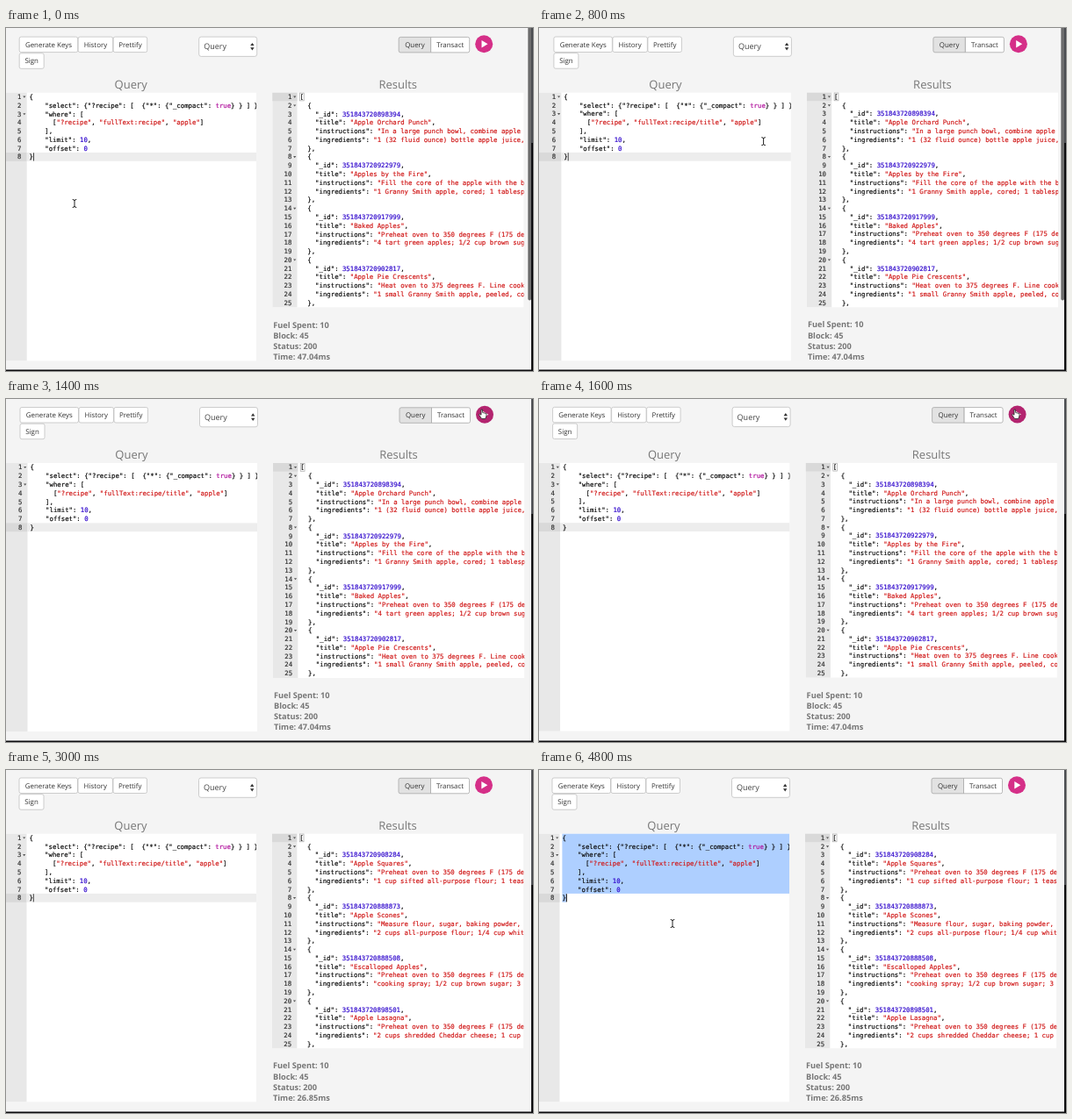
An HTML page with a canvas that plays this animation: 600x391 px, repeating every 5000 ms.

```html
<!DOCTYPE html>
<html lang="en">
<head>
<meta charset="utf-8">
<title>Query console</title>
<style>
html, body { margin: 0; width: 100%; height: 100%; overflow: hidden; background: #f4f4f4; }
canvas { display: block; width: 600px; height: 391px; }
</style>
</head>
<body>
<canvas id="stage" width="600" height="391"></canvas>
<script>
const ctx = document.getElementById('stage').getContext('2d');
const LOOP = 5000, STEP = 100, TOP = 72.4, ROW = 9.785;
const CODE_SCALE = 0.611, COL = 12 * 0.602 * CODE_SCALE;
const SANS = '"Open Sans", sans-serif', MONO = '"DejaVu Sans Mono", monospace';
const BLACK = '#0c0c0c', RED = '#d01818', BLUE = '#3008cc', PURPLE = '#b0109c';

const queryLines = path => [
  '{',
  '    "select": {"?recipe": [  {"*": {"_compact": true} } ] },',
  '    "where": [',
  `      ["?recipe", "${path}", "apple"]`,
  '    ],',
  '    "limit": 10,',
  '    "offset": 0',
  '}'
];

const resultLines = recipes => ['['].concat(...recipes.map(([id, title, steps, items]) => [
  '  {',
  `    "_id": ${id},`,
  `    "title": "${title}",`,
  `    "instructions": "${steps}",`,
  `    "ingredients": "${items}",`,
  '  },'
]));

const PREHEAT = 'Preheat oven to 350 degrees F (175 degrees C)';
const before = {
  lines: resultLines([
    ['351843720898394', 'Apple Orchard Punch', 'In a large punch bowl, combine apple juice', '1 (32 fluid ounce) bottle apple juice, chilled'],
    ['351843720922979', 'Apples by the Fire', 'Fill the core of the apple with the butter', '1 Granny Smith apple, cored; 1 tablespoon'],
    ['351843720917999', 'Baked Apples', PREHEAT, '4 tart green apples; 1/2 cup brown sugar'],
    ['351843720902817', 'Apple Pie Crescents', 'Heat oven to 375 degrees F. Line cookie', '1 small Granny Smith apple, peeled, cored']
  ]),
  time: '47.04ms'
};
const after = {
  lines: resultLines([
    ['351843720908284', 'Apple Squares', PREHEAT, '1 cup sifted all-purpose flour; 1 teaspoon'],
    ['351843720888873', 'Apple Scones', 'Measure flour, sugar, baking powder, salt', '2 cups all-purpose flour; 1/4 cup white sugar'],
    ['351843720888508', 'Escalloped Apples', PREHEAT, 'cooking spray; 1/2 cup brown sugar; 3 tart'],
    ['351843720898501', 'Apple Lasagna', PREHEAT, '2 cups shredded Cheddar cheese; 1 cup ricotta']
  ]),
  time: '26.85ms'
};

// Keyframes: time, x, y
const drift = [[0, 0.2, 1.1], [400, 1.9, 1], [1200, 1.9, 1], [1400, 1, 0.5], [1900, 0, 0]];
const pointer = [[0, 78, 200], [300, 74, 200], [600, 74, 200], [1100, 528, 23], [1400, 543, 17],
  [1600, 543, 17], [1800, 612, 6], [3800, 612, 190], [4400, 163, 177], [4600, 152, 175]];

function along(keys, t) {
  const next = keys.findIndex(k => k[0] > t);
  if (next < 0) return keys[keys.length - 1].slice(1);
  const a = keys[next - 1], b = keys[next], p = (t - a[0]) / (b[0] - a[0]);
  return [a[1] + (b[1] - a[1]) * p, a[2] + (b[2] - a[2]) * p];
}

function rect(x, y, w, h, color) {
  ctx.fillStyle = color;
  ctx.fillRect(x, y, w, h);
}

function text(str, x, y, font, color, align = 'left') {
  ctx.font = font;
  ctx.fillStyle = color;
  ctx.textAlign = align;
  ctx.fillText(str, x, y);
}

function shape(points, color, outline) {
  ctx.beginPath();
  points.forEach(([x, y]) => ctx.lineTo(x, y));
  ctx.closePath();
  ctx.fillStyle = color;
  ctx.fill();
  if (outline) {
    ctx.strokeStyle = outline;
    ctx.lineWidth = 0.8;
    ctx.stroke();
  }
}

function box(x, y, w, h, fill, radius = 2, border = '#c0c0c0') {
  ctx.beginPath();
  ctx.roundRect(x, y, w, h, radius);
  ctx.fillStyle = fill;
  ctx.fill();
  ctx.strokeStyle = border;
  ctx.lineWidth = 0.8;
  ctx.stroke();
}

function button(label, x, y, w, fill = '#fff', radius = 2, border) {
  box(x, y, w, 17.5, fill, radius, border);
  text(label, x + w / 2, y + 11.6, `7.9px ${SANS}`, '#333', 'center');
}

function codeText(str, x, y, color, align) {
  ctx.save();
  ctx.translate(x, y);
  ctx.scale(CODE_SCALE, CODE_SCALE);
  text(str, 0, 0, `12px ${MONO}`, color, align);
  // A hairline stroke gives the slightly heavier screen rendering
  ctx.strokeStyle = color;
  ctx.lineWidth = 0.3;
  ctx.strokeText(str, 0, 0);
  ctx.restore();
}

function codeLine(line, x, y) {
  for (const m of line.matchAll(/"[^"]*"(:?)|\d+|true|[^\s"\dt]+/g)) {
    const s = m[0];
    let color = BLACK;
    if (s[0] === '"' && !m[1]) color = RED;
    else if (/^\d/.test(s)) color = BLUE;
    else if (s === 'true') color = PURPLE;
    codeText(s, x + m.index * COL, y, color);
  }
}

function editor({ left, gutter, right, bottom, lines, active, focused, selected }) {
  const textX = gutter + 2.9, activeY = TOP + active * ROW;
  ctx.save();
  ctx.beginPath();
  ctx.rect(left, TOP, right - left, bottom - TOP);
  ctx.clip();
  rect(left, TOP, right - left, bottom - TOP, '#fff');
  rect(left, TOP, gutter - left, bottom - TOP, '#e8e8e8');
  rect(left, activeY, gutter - left, ROW, '#d9d9d9');
  if (selected) {
    rect(textX, TOP, right - textX, ROW * (lines.length - 1), '#aecfff');
    rect(textX, activeY, COL, ROW, '#aecfff');
  } else if (focused) {
    rect(gutter, activeY, right - gutter, ROW, '#ededed');
  }
  lines.forEach((line, i) => {
    const y = TOP + i * ROW + 7.5;
    codeText(i + 1, gutter - 6.2, y, '#333', 'right');
    if (/[[{]$/.test(line)) shape([[gutter - 4.4, y - 3.4], [gutter - 1.2, y - 3.4], [gutter - 2.8, y - 1.3]], '#555');
    codeLine(line, textX, y);
  });
  ctx.restore();
  return textX;
}

function toolbar(t) {
  button('Generate Keys', 15, 9, 66.5);
  button('History', 82, 9, 39.5);
  button('Prettify', 122, 9, 38.5);
  button('Sign', 15, 27.7, 28);
  box(219.5, 9, 66, 22.3, '#fff', 2.5);
  text('Query', 225, 23.3, `9px ${SANS}`, '#444');
  shape([[278, 19], [282.4, 19], [280.2, 15.8]], '#333');
  shape([[278, 21.2], [282.4, 21.2], [280.2, 24.4]], '#333');
  button('Query', 447, 9.3, 36.5, '#e2e2e2', [2, 0, 0, 2], '#a8a8a8');
  button('Transact', 483.5, 9.3, 44, t >= 1100 && t < 1200 ? '#e2e2e2' : '#fff', [0, 2, 2, 0], '#a8a8a8');
  ctx.beginPath();
  ctx.arc(544, 17.2, 10, 0, 7);
  ctx.fillStyle = t >= 1200 && t < 1700 ? '#b3246f' : '#d52f88';
  ctx.fill();
  shape([[541.3, 13], [541.3, 21.4], [548.3, 17.2]], '#fff');
}

function drawPointer(t) {
  const [x, y] = along(pointer, t);
  if (t >= 1800 && t < 3900) return;
  ctx.save();
  ctx.translate(x, y);
  if (y > 72) {
    ctx.beginPath();
    ctx.moveTo(-2.3, -4.5);
    ctx.quadraticCurveTo(0, -4.5, 0, -3);
    ctx.quadraticCurveTo(0, -4.5, 2.3, -4.5);
    ctx.moveTo(0, -3.5);
    ctx.lineTo(0, 3.5);
    ctx.moveTo(-2.3, 4.5);
    ctx.quadraticCurveTo(0, 4.5, 0, 3);
    ctx.quadraticCurveTo(0, 4.5, 2.3, 4.5);
    ctx.strokeStyle = '#222';
    ctx.lineWidth = 1;
    ctx.stroke();
  } else {
    shape([[-2, -5], [-0.6, -5], [-0.3, -1.5], [3.8, -0.5], [4, 2], [2.8, 5.5],
      [-1.4, 5.5], [-4.5, 1], [-3.6, 0], [-2, 1.2]], '#fff', '#222');
  }
  ctx.restore();
}

function draw(t) {
  const results = t < 1700 ? before : after;
  const selected = (t >= 200 && t < 600) || t >= 4700;
  const caret = t < 1300 || t >= 1800;

  rect(0, 0, 600, 391, '#f4f4f4');
  ctx.save();
  ctx.translate(...along(drift, t));
  toolbar(t);
  text('Query', 142, 67.7, `13px ${SANS}`, '#777', 'center');
  text('Results', 446, 67.7, `13px ${SANS}`, '#777', 'center');

  const codeX = editor({
    left: -4, gutter: 23.5, right: 285, bottom: 378.5, active: 7, focused: true, selected,
    lines: queryLines(t < 700 ? 'fullText:recipe' : 'fullText:recipe/title')
  });
  if (caret) rect(codeX + COL, TOP + 0.3 + 7 * ROW, 1, ROW - 0.6, selected ? '#000' : '#444');

  const resultX = editor({
    left: 303, gutter: 331.3, right: 589.3, bottom: 317.5, active: 0, lines: results.lines
  });
  ctx.strokeStyle = '#a8a8a8';
  ctx.lineWidth = 0.7;
  ctx.strokeRect(resultX, TOP + 0.6, COL + 0.4, ROW - 1);

  ['Fuel Spent: 10', 'Block: 45', 'Status: 200', `Time: ${results.time}`].forEach((line, i) =>
    text(line, 304, 340.4 + i * 12.1, `bold 9.2px ${SANS}`, '#777'));
  ctx.restore();

  if (t < 1300) {
    ctx.beginPath();
    ctx.roundRect(594.3, -4, 3.8, 314.5, 2);
    ctx.fillStyle = '#6c6c6c';
    ctx.fill();
  }
  rect(598, 0, 2, 131, '#4a4c50');
  rect(598, 131, 2, 260, '#0c0c0e');
  rect(0, 389.5, 600, 1.5, '#0c0c0e');
  drawPointer(t);
}

function tick() {
  const t = performance.now() % LOOP;
  ctx.textRendering = 'geometricPrecision';
  draw(Math.floor(t / STEP) * STEP);
  requestAnimationFrame(tick);
}
tick();
</script>
</body>
</html>
```
